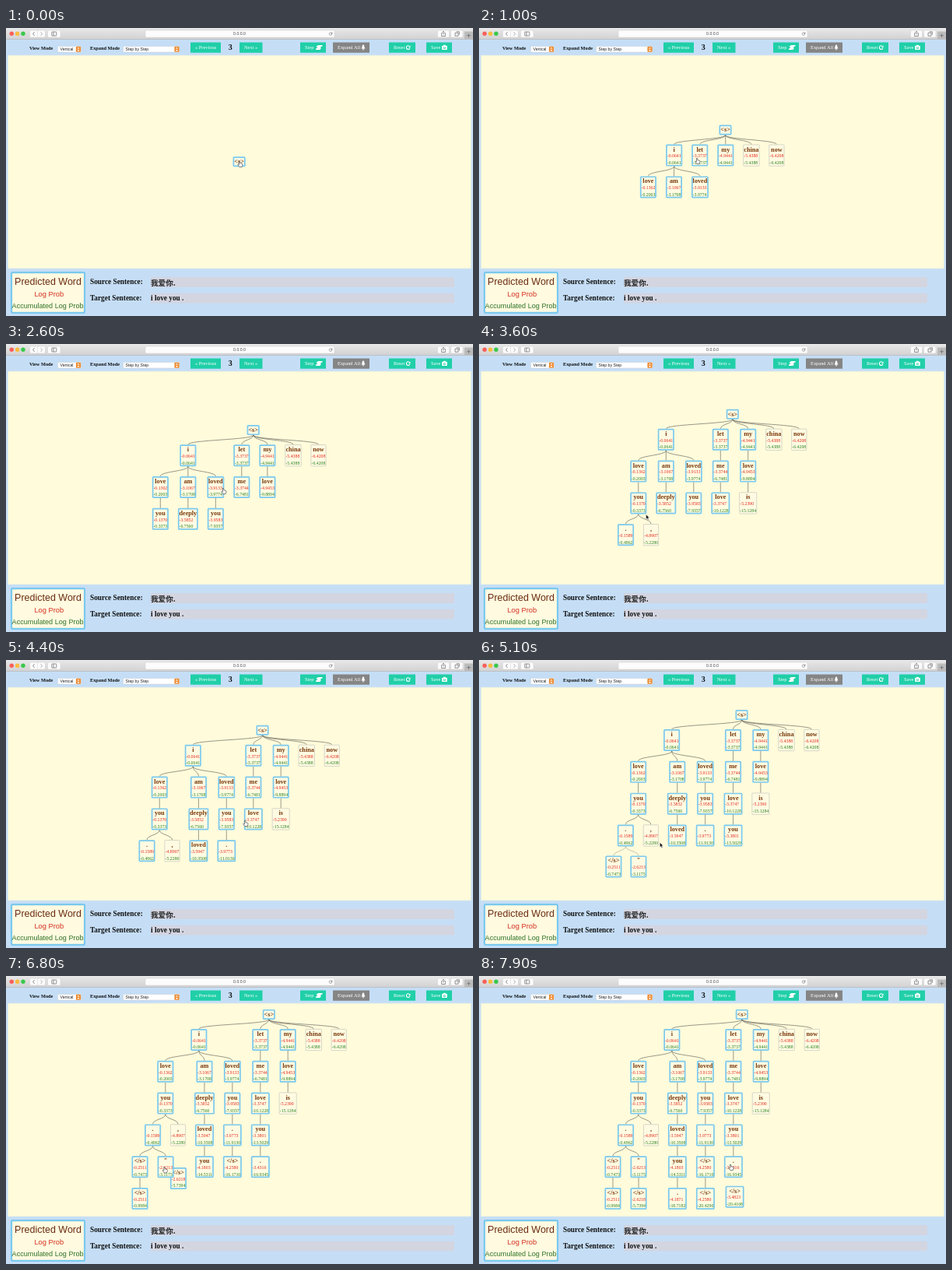
An HTML page with a canvas that plays this animation: 600 by 370 pixels, repeating every 8000 ms.

```html
<!DOCTYPE html>
<html lang="en">
<head>
<meta charset="utf-8">
<title>Beam search tree</title>
<style>
html, body { margin: 0; width: 100%; height: 100%; overflow: hidden; background: #c5def6; }
canvas { display: block; width: 600px; height: 370px; }
</style>
</head>
<body>
<canvas id="stage"></canvas>
<script>
const W = 600, H = 370, LOOP = 8000, STEP = 100, MOVE = 250;
const GAP = 12, ROOT_H = 13, NODE_H = 28, ROW = 40.8, FIRST_GAP = 12.1;
const SERIF = '"Liberation Serif", "Times New Roman", serif';
const SANS = '"Liberation Sans", Arial, sans-serif';
const CJK = '"Noto Sans CJK SC", "Noto Sans CJK", sans-serif';
const WORD = 'bold 8.2px ' + SERIF, NUM = '5.8px ' + SERIF;
const TEAL = '#20cfa8', CREAM = '#fffbdb', SKY = '#7ac9ee';
const BROWN = '#78390c', RED = '#e3281e', GREEN = '#26801f';

const canvas = document.getElementById('stage');
const dpr = window.devicePixelRatio || 1;
canvas.width = W * dpr;
canvas.height = H * dpr;
const g = canvas.getContext('2d');

function rect(x, y, w, h, fill, r = 0, stroke, lw = 1) {
  g.beginPath();
  g.roundRect(x, y, w, h, r);
  if (fill) { g.fillStyle = fill; g.fill(); }
  if (stroke) { g.strokeStyle = stroke; g.lineWidth = lw; g.stroke(); }
}
function text(s, x, y, font, fill, align = 'left') {
  g.font = font;
  g.fillStyle = fill;
  g.textAlign = align;
  g.fillText(s, x, y);
}
function line(points, stroke, lw = 0.8) {
  g.beginPath();
  points.forEach(([x, y], i) => i ? g.lineTo(x, y) : g.moveTo(x, y));
  g.strokeStyle = stroke;
  g.lineWidth = lw;
  g.stroke();
}
function disc(x, y, r, fill) {
  g.beginPath();
  g.arc(x, y, r, 0, Math.PI * 2);
  g.fillStyle = fill;
  g.fill();
}
function shape(points, fill, stroke, lw = 0.6) {
  g.beginPath();
  points.forEach(([x, y]) => g.lineTo(x, y));
  g.closePath();
  g.fillStyle = fill;
  g.fill();
  if (stroke) { g.strokeStyle = stroke; g.lineWidth = lw; g.stroke(); }
}
function reload(x, y, r, color, lw) {
  g.beginPath();
  g.arc(x, y, r, 0.2, 5.2);
  g.strokeStyle = color;
  g.lineWidth = lw;
  g.stroke();
  shape([[x + r + 0.5, y - r - 0.5], [x + r + 0.5, y], [x + r - 2, y - 0.2]], color);
}
const clamp = v => Math.max(0, Math.min(1, v));
const ease = t => t < 0.5 ? 4 * t ** 3 : 1 - 4 * (1 - t) ** 3;
const mix = (a, b, p) => a + (b - a) * p;

// Each click opens a node: [time, node, children as "word logprob"]; "~" marks a pruned child.
const clicks = [
  [150, 0, 'i .0641', 'let 3.3737', 'my 4.9441', '~china 5.4388', '~now 6.4208'],
  [550, 1, 'love .1362', 'am 3.1067', 'loved 3.9133'],
  [1100, 2, 'me 3.3744'],
  [1400, 3, 'love 4.9453'],
  [1750, 6, 'you .1370'],
  [2050, 7, 'deeply 3.58524'],
  [2330, 8, 'you 3.9583'],
  [2750, 9, 'love 3.3747'],
  [3050, 10, '~is 5.2390'],
  [3340, 11, '. .1589', '~, 4.8907'],
  [3750, 12, 'loved 3.59474'],
  [4100, 13, '. 3.9773'],
  [4480, 14, 'you 3.3801'],
  [4900, 16, '</s> .2511', '" 2.62134'],
  [5250, 18, 'you 4.1803'],
  [5600, 19, '</s> 4.2580'],
  [6080, 20, '. 3.4316'],
  [6450, 21, '</s> .2511'],
  [6750, 22, '</s> 2.62184'],
  [7050, 23, '. 4.1871'],
  [7350, 24, '</s> 4.2580'],
  [7720, 25, '</s> 3.4823']
];

function widthOf(s, font) {
  g.font = font;
  return g.measureText(s).width;
}
const nodes = [{ word: '<s>', depth: 0, sum: 0, kids: [], born: 0, h: ROOT_H, w: widthOf('<s>', WORD) + 3.6 }];
clicks.forEach(([, id, ...kids], k) => kids.forEach(entry => {
  const parent = nodes[id];
  const [label, cost] = entry.split(' ');
  const pruned = label[0] === '~', word = pruned ? label.slice(1) : label;
  const sum = parent.sum + Number(cost);
  const log = '-' + Number(cost).toFixed(4), acc = '-' + sum.toFixed(4);
  const node = { word, pruned, log, acc, sum, parent, depth: parent.depth + 1, kids: [], born: k + 1, h: NODE_H };
  node.pad = pruned ? 2 : 3.2;
  node.w = Math.max(widthOf(word, WORD), widthOf(log, NUM), widthOf(acc, NUM)) + node.pad;
  parent.kids.push(node);
  nodes.push(node);
}));

// Packs subtrees left to right by their outlines and centres each parent.
function pack(node, k) {
  const left = [], right = [], kids = node.kids.filter(c => c.born <= k);
  for (const kid of kids) {
    const sub = pack(kid, k);
    let shift = left.length ? -Infinity : 0;
    sub.left.forEach((l, d) => {
      if (d < right.length) shift = Math.max(shift, right[d] - l + GAP);
    });
    kid.rel = shift;
    sub.left.forEach((l, d) => {
      if (d >= left.length) left[d] = l + shift;
      right[d] = sub.right[d] + shift;
    });
  }
  const mid = kids.length ? (kids[0].rel + kids[kids.length - 1].rel) / 2 : 0;
  kids.forEach(c => c.rel -= mid);
  return {
    left: [-node.w / 2, ...left.map(v => v - mid)],
    right: [node.w / 2, ...right.map(v => v - mid)]
  };
}
function layout(k) {
  const box = pack(nodes[0], k), pos = new Map();
  const deep = box.left.length - 1;
  const top = 171.8 - (ROOT_H + deep * ROW) / 2;
  nodes[0].rel = 299.6 - (Math.min(...box.left) + Math.max(...box.right)) / 2;
  for (const n of nodes) {
    if (n.born > k) continue;
    const x = n.rel + (n.parent ? pos.get(n.parent).x : 0);
    const y = n.depth
      ? top + ROOT_H + FIRST_GAP + NODE_H / 2 + (n.depth - 1) * ROW
      : top + ROOT_H / 2;
    pos.set(n, { x, y });
  }
  return pos;
}
const layouts = [];
for (let k = 0; k <= clicks.length; k++) layouts.push(layout(k));

// Pointer stops: fixed rests plus a short rest on every clicked node.
const stops = [[0, 301, 175], [1000, 281, 171], [2600, 280, 189], [3600, 214.6, 219],
  [4400, 308, 210], [6000, 325, 233], [7900, 324, 246]];
clicks.forEach(([time, id], k) => {
  const { x, y } = layouts[k].get(nodes[id]);
  stops.push([time - 60, x - 2, y + 4], [time + 30, x - 2, y + 4]);
});
stops.sort((a, b) => a[0] - b[0]);

function pointerAt(t) {
  let i = 0;
  while (i < stops.length - 2 && stops[i + 1][0] <= t) i++;
  const [t0, x0, y0] = stops[i], [t1, x1, y1] = stops[i + 1];
  const p = clamp((t - t0) / (t1 - t0)), s = p * p * (3 - 2 * p);
  return { x: mix(x0, x1, s), y: mix(y0, y1, s) };
}

function drawNode(n, { x, y }) {
  const lw = n.pruned ? 0.7 : 1.7, inset = lw / 2;
  const l = x - n.w / 2, t = y - n.h / 2;
  rect(l + inset, t + inset, n.w - lw, n.h - lw, '#fffbe2', 0.8, n.pruned ? '#c5c8bd' : SKY, lw);
  text(n.word, x, n.depth ? y - 5 : y + 2.4, WORD, BROWN, 'center');
  if (!n.depth) return;
  const nx = l + n.pad / 2;
  text(n.log, nx, y + 2.7, NUM, RED);
  text(n.acc, nx, y + 11.4, NUM, GREEN);
}

function drawTree(t) {
  const k = clicks.filter(c => c[0] <= t).length;
  const p = k ? ease(clamp((t - clicks[k - 1][0]) / MOVE)) : 1;
  const now = layouts[k], old = layouts[Math.max(0, k - 1)], pos = new Map();
  for (const [n, to] of now) {
    let from = old.get(n);
    if (!from) {
      const o = old.get(n.parent);
      from = { x: o.x + n.w * 0.8, y: o.y + 14 };
    }
    pos.set(n, { x: mix(from.x, to.x, p), y: mix(from.y, to.y, p) });
  }
  for (const [n, c] of pos) {
    if (!n.parent) continue;
    const a = pos.get(n.parent);
    const y0 = a.y + n.parent.h / 2, y1 = c.y - n.h / 2, m = (y0 + y1) / 2;
    g.globalAlpha = n.born === k ? clamp((p - 0.93) / 0.07) : 1;
    g.beginPath();
    g.moveTo(a.x, y0);
    g.bezierCurveTo(a.x, m, c.x, m, c.x, y1);
    g.strokeStyle = '#55554e';
    g.lineWidth = 0.6;
    g.stroke();
  }
  g.globalAlpha = 1;
  [...pos].reverse().forEach(([n, c]) => drawNode(n, c));
  return pos;
}

function drawPointer(t, pos) {
  const { x, y } = pointerAt(t);
  const over = [...pos].some(([n, c]) => Math.abs(x - c.x) < n.w / 2 && Math.abs(y - c.y) < n.h / 2);
  g.save();
  g.translate(x, y);
  if (over) {
    shape([[-1.6, -3.6], [-0.4, -3.6], [0, -1.2], [2.6, -0.6], [3, 0.6], [2.2, 3.6], [-1.2, 3.6],
      [-3.2, 0.6], [-2.6, 0], [-1.4, 0.8]], '#fff', '#333');
  } else {
    shape([[0, 0], [0, 6], [1.4, 4.8], [2.4, 7], [3.4, 6.5], [2.4, 4.4], [4.2, 4.3]], '#111', '#fff', 0.4);
  }
  g.restore();
}

function drawBrowser() {
  const bar = g.createLinearGradient(0, 0, 0, 15);
  bar.addColorStop(0, '#e9e8e9');
  bar.addColorStop(1, '#d2d1d2');
  rect(0, 0, W, 14.5, bar);
  line([[0, 14.5], [W, 14.5]], '#b4b6b9', 0.7);
  ['#f9605a', '#f8bd3c', '#39c84b'].forEach((c, i) => disc(7.2 + i * 7.4, 7.3, 2.7, c));
  [[30.5, 20], [53.5, 16.5], [554.5, 15], [571.5, 15.5]].forEach(([x, w]) =>
    rect(x, 3, w, 9, '#fbfbfb', 1.5, '#cfcfcf', 0.5));
  line([[40.5, 3], [40.5, 12]], '#d5d5d5', 0.5);
  line([[36.6, 5.2], [34.6, 7.5], [36.6, 9.8]], '#666');
  line([[44.6, 5.2], [46.6, 7.5], [44.6, 9.8]], '#999');
  rect(58.8, 5, 6, 5, null, 0.5, '#666', 0.7);
  line([[61, 5], [61, 10]], '#666', 0.7);
  rect(179, 3, 243, 9, '#fcfcfc', 1.5, '#cfcfcf', 0.5);
  text('0.0.0.0', 300, 9.4, '5.2px ' + SANS, '#444', 'center');
  reload(417, 7.6, 1.8, '#777', 0.6);
  line([[560.6, 6.5], [559.6, 6.5], [559.6, 10.5], [564.4, 10.5], [564.4, 6.5], [563.4, 6.5]], '#666', 0.7);
  line([[562, 8.5], [562, 4.2]], '#666', 0.7);
  line([[560.8, 5.4], [562, 4.2], [563.2, 5.4]], '#666', 0.6);
  rect(577, 6.2, 4, 4, null, 0, '#666', 0.7);
  line([[578.6, 4.8], [582.4, 4.8], [582.4, 8.6]], '#666', 0.7);
  rect(589, 4.5, 11, 10, '#bcbcbc');
  line([[592, 9.7], [597, 9.7]], '#666', 0.7);
  line([[594.5, 7.2], [594.5, 12.2]], '#666', 0.7);
}

function select(x, w, label) {
  rect(x, 23.6, w, 7.4, '#fff', 1.2, '#c8ccd2', 0.5);
  rect(x + w - 6.6, 23.8, 6.2, 7, '#ee8d33', 1.2);
  const cx = x + w - 3.5;
  shape([[cx - 1.5, 26.6], [cx + 1.5, 26.6], [cx, 24.7]], '#fff');
  shape([[cx - 1.5, 28], [cx + 1.5, 28], [cx, 29.9]], '#fff');
  text(label, x + 3, 29.2, '5.2px ' + SANS, '#222');
}
function button(x, w, label, tx, fill = TEAL) {
  rect(x, 18.5, w, 13.3, fill);
  text(label, tx, 27.4, '6.4px ' + SERIF, '#fff');
}

function drawToolbar() {
  const label = 'bold 6.3px ' + SERIF;
  text('View Mode', 30, 27.6, label, '#111');
  select(66.5, 30, 'Vertical');
  text('Expand Mode', 108, 27.6, label, '#111');
  select(150.5, 72.5, 'Step by Step');
  button(237, 39, '« Previous', 243);
  text('3', 288.3, 28.3, 'bold 10px ' + SERIF, '#111', 'center');
  button(300, 29.5, 'Next »', 306);
  button(378, 33, 'Step', 384);
  shape([[398.5, 24], [401, 22], [406.5, 22], [406.5, 23.6], [403.8, 24.2], [404.8, 25.4], [403.5, 28],
    [398, 28], [398, 26.4], [400.5, 25.6]], '#fff');
  button(420, 47, 'Expand All', 426, '#858585');
  shape([[459, 21], [460.8, 23.6], [460, 23.6], [461.6, 26.6], [459.6, 26.6], [459.6, 28.4],
    [458.4, 28.4], [458.4, 26.6], [456.4, 26.6], [458, 23.6], [457.2, 23.6]], '#fff');
  button(492, 34, 'Reset', 498);
  reload(516.7, 25.1, 2.3, '#fff', 1.1);
  button(540, 33, 'Save', 546);
  rect(560, 22.8, 6.8, 5.2, '#fff', 0.8);
  rect(562, 21.8, 2.8, 1.4, '#fff');
  disc(563.4, 25.4, 1.5, TEAL);
  disc(563.4, 25.4, 0.8, '#fff');
}

function drawFooter() {
  rect(7, 314.2, 94, 51.6, '#fffae0', 1.5, SKY, 2.2);
  text('Predicted Word', 54, 330.3, '12.5px ' + SANS, '#6a2c10', 'center');
  text('Log Prob', 55.3, 345.4, '9.3px ' + SANS, '#d5301f', 'center');
  text('Accumulated Log Prob', 53.6, 360, '9.1px ' + SANS, '#2e7326', 'center');
  const bold = 'bold 9.3px ' + SERIF;
  rect(186, 320, 390, 13, '#d3d5e1');
  rect(186, 340.8, 390, 12.6, '#d3d5e1');
  text('Source Sentence:', 108, 328.6, bold, '#111');
  text('Target Sentence:', 108, 349.6, bold, '#111');
  text('我爱你.', 186, 330.6, 'bold 9.6px ' + CJK, '#222');
  text('i love you .', 186, 349.8, bold, '#111');
}

function draw(t) {
  g.setTransform(dpr, 0, 0, dpr, 0, 0);
  rect(0, 0, W, H, '#c5def6');
  drawBrowser();
  drawToolbar();
  rect(2.5, 35, 595, 274, CREAM, 0, '#dbe6e6', 0.8);
  drawFooter();
  drawPointer(t, drawTree(t));
}

const start = performance.now();
function tick() {
  const t = (performance.now() - start) % LOOP;
  draw(Math.floor(t / STEP) * STEP);
  requestAnimationFrame(tick);
}
tick();
</script>
</body>
</html>
```
